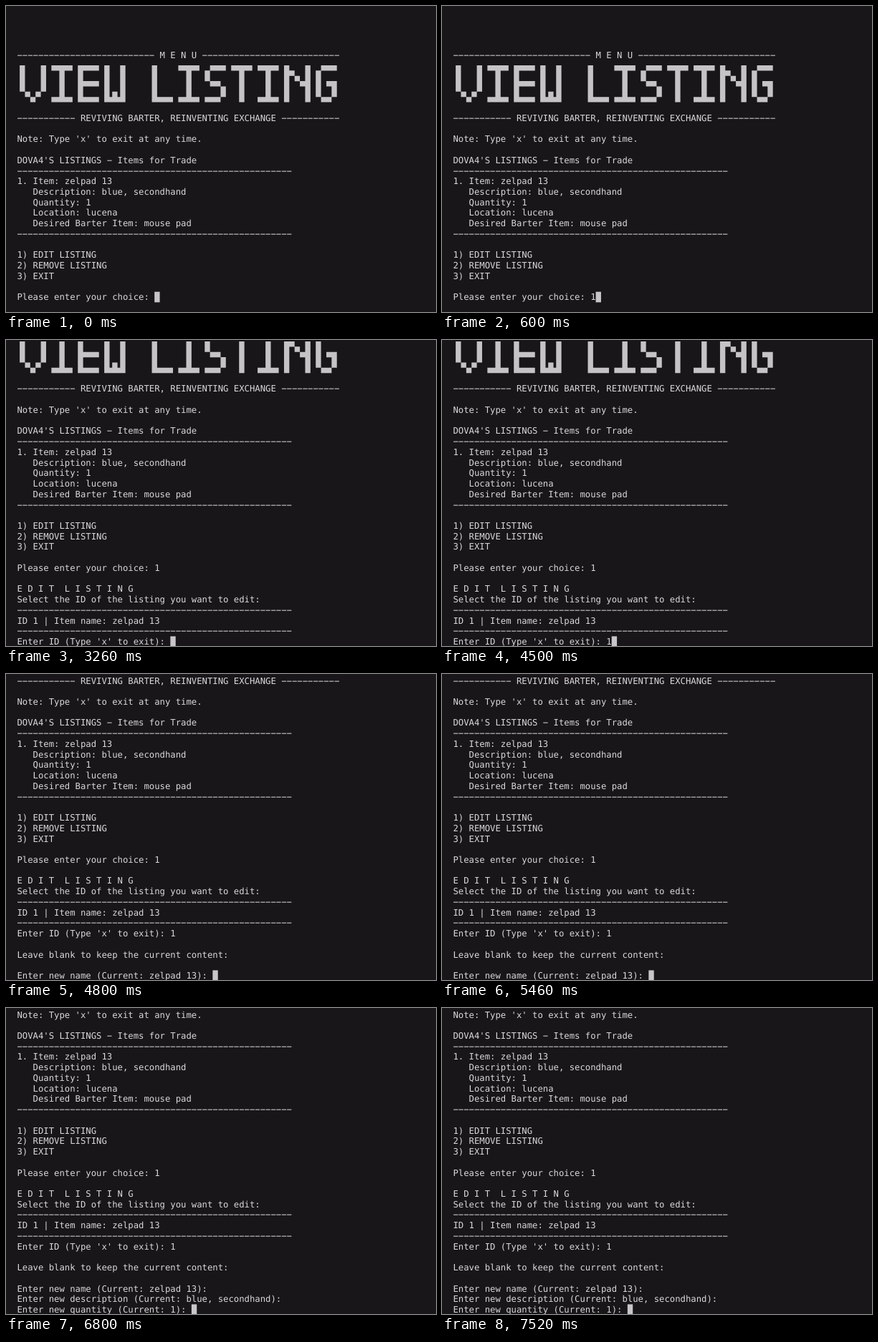
These frames come from a looping animation (600 by 428 pixels, 8000 ms). An HTML page:

```html
<!DOCTYPE html>
<html lang="en">
<head>
<meta charset="utf-8">
<title>Barter terminal</title>
<style>
  html, body { margin: 0; width: 100%; height: 100%; overflow: hidden; background: #181619; }
  svg { display: block; width: 600px; height: 428px; }
  text {
    font: 12.253px "DejaVu Sans Mono", "Liberation Mono", monospace;
    fill: #dad8da;
    white-space: pre;
    text-rendering: geometricPrecision;
    font-variant-ligatures: none;
  }
</style>
</head>
<body>
<svg id="stage" viewBox="0 0 600 428">
  <defs><clipPath id="view"><rect y="2" width="600" height="426"/></clipPath></defs>
  <g clip-path="url(#view)">
    <g id="page"><path id="banner" fill="#c5c3c6"/></g>
    <rect id="cursor" fill="#c8c6c8"/>
  </g>
</svg>
<script>
const LOOP = 8000;
const LEFT = 15.4, TOP = 60.9;       // first cell of the first row
const CELL = 7.377, ROW = 14.73;     // character grid
const BASE = 11.6;                   // baseline inside a row
const MAX_ROW = 24;                  // lowest row before the page scrolls

const $ = id => document.getElementById(id);
const dash = n => "\u2212".repeat(n);
const rule = dash(52);

const BANNER = [
  "▗▖  ▗▖▗▄▄▄▖▗▄▄▄▖▗▖ ▗▖    ▗▖   ▗▄▄▄▖ ▗▄▄▖▗▄▄▄▖▗▄▄▄▖▗▖  ▗▖ ▗▄▄▖",
  "▐▌  ▐▌  █  ▐▌   ▐▌ ▐▌    ▐▌     █  ▐▌     █    █  ▐▛▚▖▐▌▐▌   ",
  "▐▌  ▐▌  █  ▐▛▀▀▘▐▌ ▐▌    ▐▌     █   ▝▀▚▖  █    █  ▐▌ ▝▜▌▐▌▝▜▌",
  " ▝▚▞▘ ▗▄█▄▖▐▙▄▄▖▐▙█▟▌    ▐▙▄▄▖▗▄█▄▖▗▄▄▞▘  █  ▗▄█▄▖▐▌  ▐▌▝▚▄▞▘"
];

const LINES = [
  dash(26) + " M E N U " + dash(26),
  "", "", "", "", "",
  dash(11) + " REVIVING BARTER, REINVENTING EXCHANGE " + dash(11),
  "",
  "Note: Type 'x' to exit at any time.",
  "",
  "DOVA4'S LISTINGS \u2212 Items for Trade",
  rule,
  "1. Item: zelpad 13",
  "   Description: blue, secondhand",
  "   Quantity: 1",
  "   Location: lucena",
  "   Desired Barter Item: mouse pad",
  rule,
  "",
  "1) EDIT LISTING",
  "2) REMOVE LISTING",
  "3) EXIT",
  "",
  "Please enter your choice: 1",
  "",
  "E D I T  L I S T I N G",
  "Select the ID of the listing you want to edit:",
  rule,
  "ID 1 | Item name: zelpad 13",
  rule,
  "Enter ID (Type 'x' to exit): 1",
  "",
  "Leave blank to keep the current content:",
  "",
  "Enter new name (Current: zelpad 13): ",
  "Enter new description (Current: blue, secondhand): ",
  "Enter new quantity (Current: 1): "
];

// start time, row of the cursor, characters still to be typed there
const STEPS = [
  [0, 23, 1], [600, 23, 0],
  [1400, 30, 1], [4500, 30, 0],
  [4800, 34, 0], [5900, 35, 0], [6800, 36, 0]
];

// filled quarters of a block: 1 top left, 2 top right, 4 bottom left, 8 bottom right
const QUARTERS = {
  "▘": 1, "▝": 2, "▀": 3, "▖": 4, "▌": 5, "▞": 6, "▛": 7, "▗": 8,
  "▚": 9, "▐": 10, "▜": 11, "▄": 12, "▙": 13, "▟": 14, "█": 15
};

function bannerPath() {
  let d = "";
  BANNER.forEach((line, r) => {
    for (let half = 0; half < 2; half++) {
      const y = TOP + (r + 1 + half / 2) * ROW;
      const on = [...line].flatMap(c => {
        const bits = (QUARTERS[c] || 0) >> (2 * half);
        return [bits & 1, bits & 2];
      });
      for (let i = 0; i < on.length; i++) {
        if (!on[i]) continue;
        const start = i;
        while (on[i]) i++;
        d += `M${LEFT + start * CELL / 2} ${y}h${(i - start) * CELL / 2}v${ROW / 2 + 0.05}h${(start - i) * CELL / 2}z`;
      }
    }
  });
  return d;
}

$("banner").setAttribute("d", bannerPath());

const rows = LINES.map((line, r) => {
  const el = document.createElementNS("http://www.w3.org/2000/svg", "text");
  el.setAttribute("x", LEFT);
  el.setAttribute("y", TOP + r * ROW + BASE);
  $("page").append(el);
  return el;
});

let shown = null;

function draw(ms) {
  const step = STEPS.findLast(s => s[0] <= ms);
  if (step === shown) return;
  shown = step;
  const [, last, left] = step;
  const typed = LINES[last].length - left;
  const scroll = Math.max(0, last - MAX_ROW);

  rows.forEach((el, r) => {
    const visible = r >= scroll - 4 && r <= last;
    el.textContent = !visible ? "" : r === last ? LINES[r].slice(0, typed) : LINES[r];
  });
  $("page").setAttribute("transform", `translate(0 ${-scroll * ROW})`);

  const cursor = $("cursor");
  cursor.setAttribute("x", LEFT + typed * CELL);
  cursor.setAttribute("y", TOP + (last - scroll) * ROW);
  cursor.setAttribute("width", CELL);
  cursor.setAttribute("height", ROW);
}

const began = performance.now();
function tick() {
  draw((performance.now() - began) % LOOP);
  requestAnimationFrame(tick);
}
tick();
</script>
</body>
</html>
```
